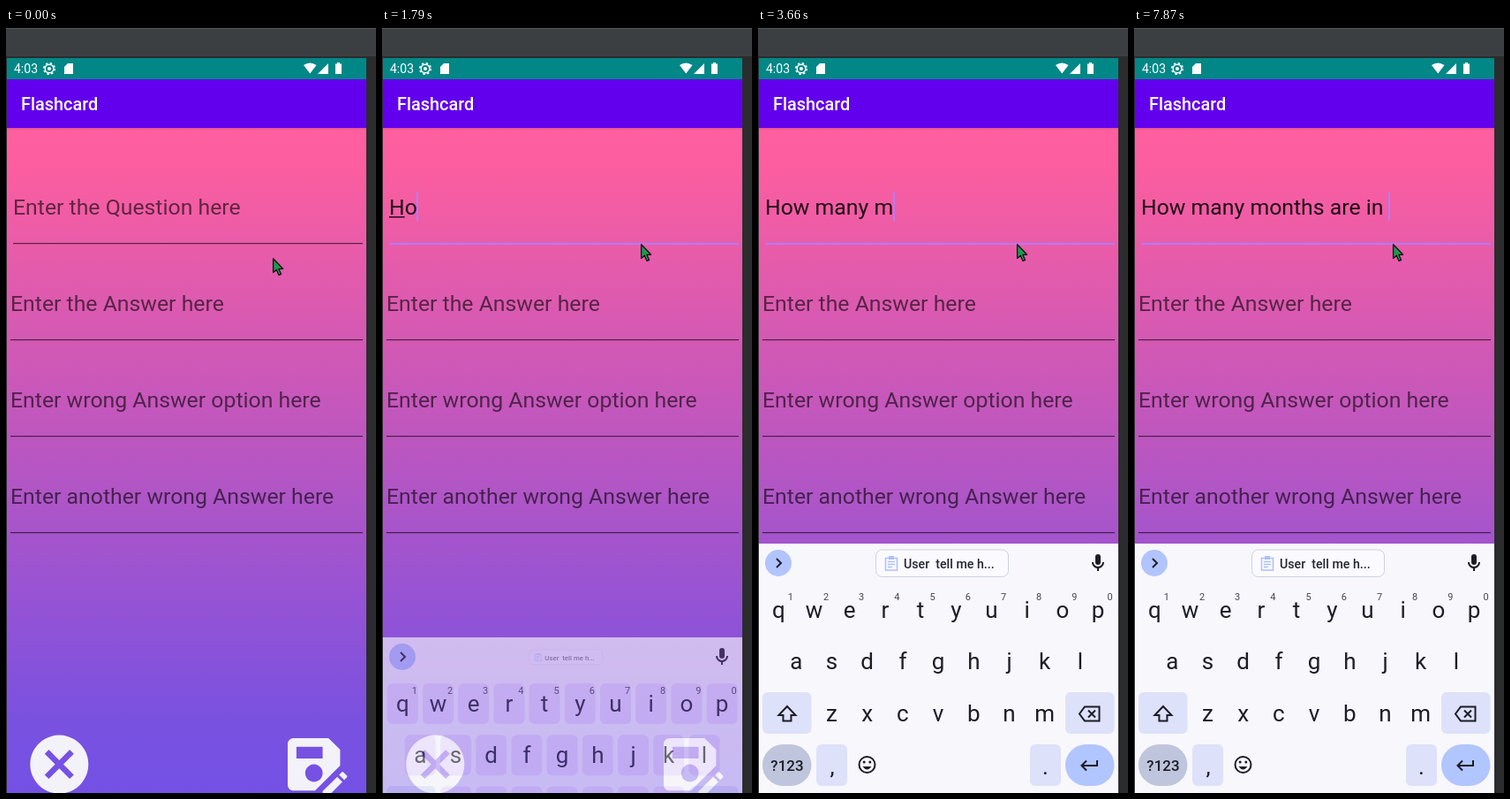
These frames come from a looping animation (419x865 px, 8000 ms). An HTML page:

```html
<!DOCTYPE html>
<html lang="en">
<head>
<meta charset="utf-8">
<title>Flashcard form</title>
<style>
html, body { margin: 0; width: 100%; height: 100%; overflow: hidden; background: #2e2f30; }
svg { display: block; width: 419px; height: 865px; font-family: Roboto, sans-serif; }
text { white-space: pre; }
.field { font-size: 24.8px; fill: rgba(0,0,0,.6); }
.key { font-size: 26px; fill: #1d1d26; text-anchor: middle; }
.digit { font-size: 11px; fill: #44464f; text-anchor: middle; }
.line { fill: none; stroke: #1d1d26; stroke-width: 2; }
</style>
</head>
<body>
<svg viewBox="0 0 419 865">
  <defs>
    <linearGradient id="sky" x2="0" y2="1">
      <stop offset="0" stop-color="#ff5f9f"/>
      <stop offset=".05" stop-color="#fd5e9f"/>
      <stop offset=".5" stop-color="#b856c2"/>
      <stop offset=".72" stop-color="#9453d5"/>
      <stop offset=".9" stop-color="#7851e0"/>
      <stop offset="1" stop-color="#7451e5"/>
    </linearGradient>
  </defs>

  <path fill="#2b2c2d" d="M0 0H419V865H0z"/>
  <path fill="#3c3f41" d="M0 0H419V32H0z"/>
  <path fill="#55585a" d="M0 0H419V1H0z"/>
  <path fill="#018786" d="M1 34H408V58H1z"/>
  <path fill="url(#sky)" d="M1 113H408V865H1z"/>
  <path fill="#6200ee" d="M1 58H408V113H1z"/>
  <path fill="#000" opacity=".08" d="M1 113H408V115H1z"/>

  <g fill="#fff">
    <text x="9" y="51" font-size="14">4:03</text>
    <g fill="none" stroke="#fff">
      <circle cx="49" cy="46" r="4.8" stroke-width="1.4"/>
      <circle cx="49" cy="46" r="6.2" stroke-width="1.6" stroke-dasharray="2.4 2.47"/>
    </g>
    <circle cx="49" cy="46" r="2"/>
    <path d="M70 40H76V52H66V44z"/>
    <path d="M337 42Q344 37 351.500 42L344.300 51.500z"/>
    <path d="M353 52L365 40V52z"/>
    <path d="M375 39H378V40.500H380V52H373V40.500H375z"/>
    <text x="17" y="93" font-size="19.9" font-weight="500">Flashcard</text>
  </g>

  <g id="fields"></g>
  <path id="rule" d="M8 243H404V245H8z" fill="#ae7efa"/>
  <text id="typed" class="field" x="8" y="211" style="fill:rgba(0,0,0,.87)"></text>
  <rect id="under" y="213" height="1.5" fill="rgba(0,0,0,.85)"/>
  <rect id="caret" y="185" width="2" height="33" fill="#ae7efa"/>

  <g fill="#f3f2f8" fill-rule="evenodd">
    <path transform="translate(20.700 793) scale(3.3)" d="M12 2a10 10 0 1 0 .01 0zM17 15.590L15.590 17 12 13.410 8.410 17 7 15.590 10.590 12 7 8.410 8.410 7 12 10.590 15.590 7 17 8.410 13.410 12z"/>
    <path transform="translate(309.100 793) scale(3.3)" d="M21 12.400V7l-4-4H5C3.900 3 3 3.900 3 5v14c0 1.100.9 2 2 2h7.400zM12 12a3 3 0 1 0 .01 0zM6 6h9v4H6zM20 16.250l1.770 1.770L16.770 23H15v-1.770zM23.250 16.510l-.85.85-1.770-1.770.85-.85a.5.5 0 0 1 .71 0l1.060 1.060a.5.5 0 0 1 0 .71z"/>
  </g>

  <g id="board">
    <path fill="#f8f7fc" d="M1 583H408V866H1z"/>
    <g id="caps" fill="#dfc9ff" opacity=".5"></g>
    <circle cx="23" cy="605" r="15" fill="#b1c4fe"/>
    <path class="line" d="M21 600L26 605L21 610"/>
    <g id="chip">
      <rect x="133.500" y="590" width="150" height="30.500" rx="7" fill="#fbfaff" stroke="#cfd1dd"/>
      <g fill="none" stroke="#adc1fa" stroke-width="1.500">
        <path d="M144.500 599.500H157.500V613H144.500zM147 603.500H155M147 606.500H155M147 609.500H152"/>
        <path d="M148 599H154" stroke-width="4"/>
      </g>
      <text x="165" y="611" font-size="14.200" font-weight="500" fill="#25262e">User  tell me h...</text>
    </g>
    <path fill="#1d1d26" transform="translate(373 593)" d="M12 14a3 3 0 0 0 3-3V5a3 3 0 0 0-6 0v6a3 3 0 0 0 3 3zm5-3a5 5 0 0 1-10 0H5c0 3.530 2.610 6.430 6 6.920V21h2v-3.080c3.390-.49 6-3.390 6-6.920z"/>
    <g fill="#dde1f9">
      <rect x="5" y="751" width="55.500" height="47" rx="6"/>
      <rect x="348" y="751" width="55.500" height="47" rx="6"/>
      <rect x="66" y="810" width="35" height="47" rx="6"/>
      <rect x="308" y="810" width="35" height="47" rx="6"/>
      <rect x="5" y="810" width="55.500" height="47" rx="23.500" fill="#bfc5dc"/>
      <rect x="348" y="810" width="55.500" height="47" rx="23.500" fill="#b1c5ff"/>
    </g>
    <g id="keys"></g>
    <text x="33" y="840" font-size="17" font-weight="500" text-anchor="middle" fill="#1d1d26">?123</text>
    <text class="key" x="84" y="844">,</text>
    <text class="key" x="325.500" y="844">.</text>
    <path class="line" d="M33 767L23.500 777H28.500V783.500H37.500V777H42.500z"/>
    <path class="line" d="M370 767.500H386.500V783.500H370L364 775.500zM374 771.500L382 779.500M382 771.500L374 779.500"/>
    <path class="line" d="M384 828V834H367M372 828.500L366.500 834L372 839.500"/>
    <circle class="line" cx="123.500" cy="833" r="9"/>
    <g fill="#1d1d26">
      <circle cx="120.200" cy="830" r="1.500"/>
      <circle cx="126.800" cy="830" r="1.500"/>
      <path d="M118.500 835H128.500Q123.500 842 118.500 835z"/>
    </g>
  </g>

  <path id="mouse" fill="#1c9a4e" stroke="#111" stroke-width="1.300" stroke-linejoin="round" d="M.6 .8V16.500L4.300 13.200 7 19.400 9.500 18.300 6.900 12.300H11.600z"/>
</svg>
<script>
const $ = id => document.getElementById(id);
const LOOP = 8000, LEFT = 8;
const TEXT = "How many months are in ";

// time, characters typed, end of the underlined word (0 = none)
const STEPS = [
  [800, 1, 0], [1670, 2, 1], [1940, 3, 2], [2060, 3, 3], [2340, 4, 3],
  [2520, 5, 0], [2690, 6, 5], [2870, 7, 6], [3050, 8, 7], [3230, 9, 8],
  [3510, 9, 0], [3660, 10, 0], [3810, 10, 10], [3960, 11, 10], [4110, 12, 11],
  [4390, 12, 12], [4540, 13, 12], [4770, 14, 13], [5040, 14, 14], [5320, 15, 14],
  [5460, 15, 15], [5690, 16, 15], [5960, 17, 0], [6240, 18, 17], [6390, 19, 18],
  [6670, 20, 19], [6890, 20, 0], [7200, 21, 0], [7340, 22, 21], [7470, 22, 22],
  [7600, 23, 22], [7870, 23, 0]
];

const HINTS = ["Enter the Question here", "Enter the Answer here",
  "Enter wrong Answer option here", "Enter another wrong Answer here"];
$("fields").innerHTML = HINTS.map((hint, i) => {
  const x = i ? 5 : LEFT, y = 211 + 109 * i;
  return `<g><text class="field" x="${x}" y="${y}">${hint}</text>
    <rect x="${x}" y="${y + 32}" width="${404 - x}" height="1.2" fill="rgba(0,0,0,.62)"/></g>`;
}).join("");
const firstField = $("fields").firstElementChild;

let keys = "", caps = "";
["qwertyuiop", "asdfghjkl", "zxcvbnm"].forEach((row, r) => [...row].forEach((ch, i) => {
  const x = [23.3, 43.3, 83.5][r] + 40.2 * i, y = 667 + 58.3 * r;
  caps += `<rect x="${x - 17.5}" y="${y - 32}" width="35" height="46" rx="6"/>`;
  keys += `<text class="key" x="${x}" y="${y}">${ch}</text>`;
  if (!r) keys += `<text class="digit" x="${x + 13.5}" y="647">${(i + 1) % 10}</text>`;
}));
$("keys").innerHTML = keys;
$("caps").innerHTML = caps;

const pen = document.createElement("canvas").getContext("2d");
pen.font = "24.8px Roboto, sans-serif";
const edge = n => LEFT + pen.measureText(TEXT.slice(0, n)).width;
const set = (el, attrs) => { for (const k in attrs) el.setAttribute(k, attrs[k]); };
const show = (el, on) => el.setAttribute("visibility", on ? "visible" : "hidden");

function draw(t) {
  const [, count, end] = STEPS.findLast(s => s[0] <= t) || [0, 0, 0];
  const start = end ? TEXT.lastIndexOf(" ", end - 1) + 1 : 0;
  $("typed").textContent = TEXT.slice(0, count);
  set($("under"), { x: edge(start), width: edge(end) - edge(start) });
  set($("caret"), { x: Math.floor(edge(count) + .1) });
  show($("caret"), count && !(t >= 1390 && t < 1670));
  show($("rule"), count);
  show(firstField, !count);

  const rising = t < 1940;
  show($("board"), t >= 1790);
  show($("caps"), t >= 1790 && rising);
  set($("board"), { opacity: rising ? .64 : 1, transform: `translate(0 ${rising ? 106 : 0})` });
  set($("chip"), {
    opacity: rising ? .55 : 1,
    transform: rising ? "translate(208 605.5) scale(.55) translate(-208 -605.5)" : ""
  });
  set($("mouse"), { transform: t < 150 ? "translate(302 260)" : "translate(293 244)" });
}

const begin = performance.now();
function tick() {
  draw((performance.now() - begin) % LOOP);
  requestAnimationFrame(tick);
}
tick();
</script>
</body>
</html>
```
